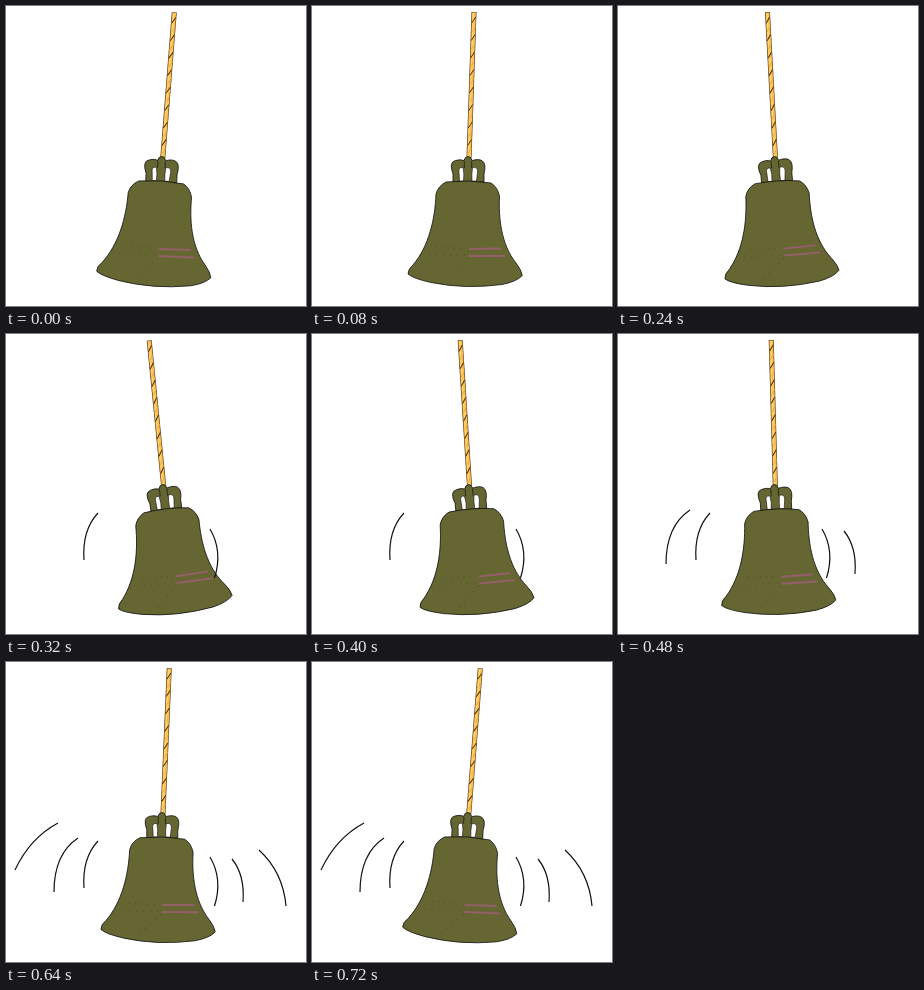
Animation of 300 by 300 pixels, one loop 0.8 s. Source, as an HTML page with a canvas:

```html
<!DOCTYPE html>
<html lang="en">
<head>
<meta charset="utf-8">
<title>Swinging bell</title>
<style>
html, body { margin: 0; width: 100%; height: 100%; overflow: hidden; background: #fff; }
canvas { display: block; width: 300px; height: 300px; }
</style>
</head>
<body>
<canvas id="stage" width="300" height="300"></canvas>
<script>
const ctx = document.getElementById('stage').getContext('2d');
const STEP = 80, STEPS = 10;
const PIVOT = { x: 157, y: 147 };
const OLIVE = '#666633', INK = '#111';

const handle = new Path2D(`
  M141 176 L141 168 Q136.5 156 143.5 154.5 Q148 153 152 154.5
  Q153 150.5 156 150.5 Q159 150.5 160 154.5 Q167 152.5 170.5 155
  Q174.5 158 172 168 L172 176 Z`);
const holes = new Path2D(`
  M147.5 175 L147 166 Q146 161 151 161.5 Q152.5 168 151.5 175 Z
  M160 175 Q159.5 168 160.5 161.5 Q166 160.5 165.5 166 L164.5 175 Z`);
const body = new Path2D(`
  M124 188 Q126 180 134 176 Q157 173.5 179 177 Q185.5 181 187.5 190
  C186.5 212 189 238 204 257 Q209.5 264 210.3 269.5
  Q205 275.5 190 278.5 Q153 283.5 119 276.5 Q101 272.5 96 268
  Q96 263 101 259 C117 240 123 213 124 188 Z`);

// Each ring is a left and a right arc: start, control, end.
const rings = [
  ['M92 179 Q76 196 78 226', 'M204 195 Q217 217 208.5 244'],
  ['M72 176 Q48 192 48 230', 'M226 197 Q239 213 237 240'],
  ['M52 161 Q24 176 9 208', 'M253 188 Q277 210 280 244']
].map(pair => new Path2D(pair.join(' ')));

function shape(path, fill, width) {
  ctx.fillStyle = fill;
  ctx.fill(path);
  ctx.strokeStyle = INK;
  ctx.lineWidth = width;
  ctx.stroke(path);
}

function line(x1, y1, x2, y2, color, width, dash = []) {
  ctx.beginPath();
  ctx.moveTo(x1, y1);
  ctx.lineTo(x2, y2);
  ctx.strokeStyle = color;
  ctx.lineWidth = width;
  ctx.setLineDash(dash);
  ctx.stroke();
  ctx.setLineDash([]);
}

function drawRope() {
  const top = 162, bottom = 157;
  line(top, 6, bottom, 152, '#4a3518', 5);
  line(top, 6.5, bottom, 152, '#ffc04d', 3.8);
  line(top - 0.6, 7, bottom - 0.6, 152, '#ffd877', 1);
  for (let y = 13; y < 150; y += 17.5) {
    const x = top + (y - 6) * (bottom - top) / 146;
    line(x - 2, y + 4, x + 2, y - 2, '#4a2a0c', 1);
    line(x - 2, y + 13, x + 2, y + 7, '#e8a040', 0.8);
  }
}

function drawBell() {
  shape(handle, OLIVE, 0.8);
  shape(holes, '#fff', 0.6);
  line(152.3, 155, 152.3, 162, INK, 0.7);
  line(159.7, 155, 159.7, 162, INK, 0.7);
  shape(body, OLIVE, 0.8);
  line(157, 243, 189, 242.6, '#935f68', 2);
  line(157, 250, 193, 250, '#935f68', 2);
  line(124, 241, 154, 243, '#4d4d26', 1, [1, 5]);
  line(117, 249, 153, 249, '#4d4d26', 1, [1, 6]);
  line(135, 272, 158, 251, '#4d4d26', 1, [1, 6]);
}

// Four equal steps to the right, then five back.
function swing(step) {
  const degrees = step <= 4 ? 2.55 - 2.55 * step : -7.65 + 2.04 * (step - 4);
  return degrees * Math.PI / 180;
}

function draw(now) {
  const step = Math.floor(now / STEP) % STEPS;
  ctx.fillStyle = '#fff';
  ctx.fillRect(0, 0, 300, 300);
  ctx.save();
  ctx.translate(PIVOT.x, PIVOT.y);
  ctx.rotate(swing(step));
  ctx.translate(-PIVOT.x, -PIVOT.y);
  drawRope();
  drawBell();
  ctx.restore();

  const visible = Math.max(0, Math.floor(step / 2) - 1);
  ctx.strokeStyle = INK;
  ctx.lineWidth = 1.2;
  rings.slice(0, visible).forEach(ring => ctx.stroke(ring));
}

const start = performance.now();
function tick() {
  draw(performance.now() - start);
  requestAnimationFrame(tick);
}
tick();
</script>
</body>
</html>
```
